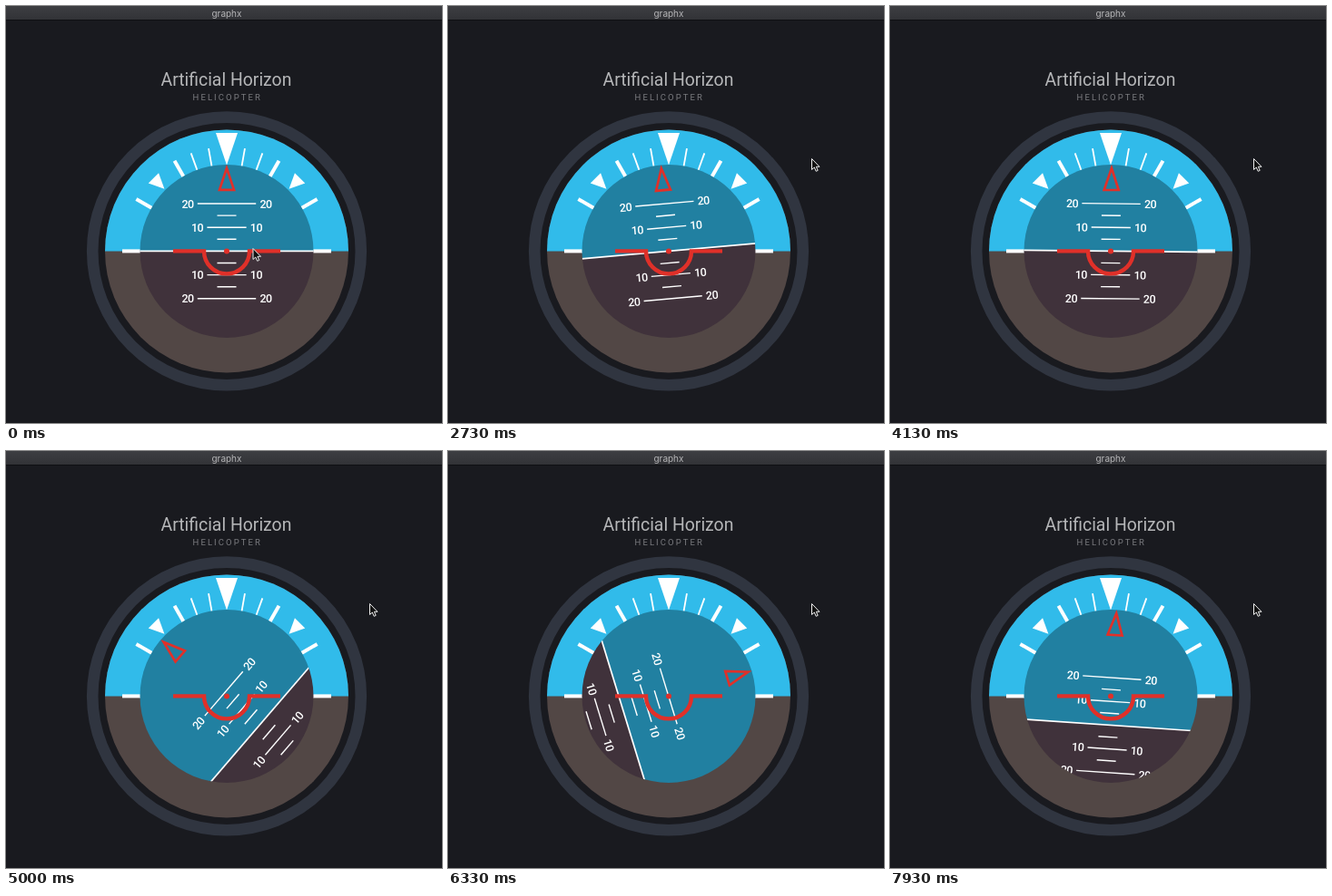
Animation, 480 px wide and 460 px high, one loop 8000 ms. Source, as an HTML page:

```html
<!DOCTYPE html>
<html lang="en">
<head>
<meta charset="utf-8">
<title>Artificial Horizon</title>
<style>
  html, body { margin: 0; width: 100%; height: 100%; overflow: hidden; background: #191a1f; }
  svg { display: block; width: 480px; height: 460px; }
  text { font-family: Roboto, "Open Sans", sans-serif; }
  .label { font-size: 12.5px; font-weight: 500; letter-spacing: -0.5px; fill: #fff; text-anchor: middle; }
</style>
</head>
<body>
<svg viewBox="0 0 480 460">
  <defs>
    <linearGradient id="bar" x2="0" y2="1">
      <stop stop-color="#3d3e42"/>
      <stop offset="1" stop-color="#323337"/>
    </linearGradient>
    <clipPath id="lens"><circle r="95.5"/></clipPath>
  </defs>

  <rect width="480" height="460" fill="#191a1f"/>
  <rect width="480" height="15" fill="url(#bar)"/>
  <rect y="15" width="480" height="1" fill="#0f1013"/>
  <text x="243" y="11.5" text-anchor="middle" fill="#b5b5b7" style="font: 10px Inter, sans-serif">graphx</text>
  <text x="170.5" y="88" font-size="19.4" fill="#b5b6b8">Artificial Horizon</text>
  <text x="205.5" y="104" font-size="9.5" letter-spacing="2.1" fill="#7b7c80">HELICOPTER</text>

  <g transform="translate(243 270.4)">
    <circle r="147.8" fill="none" stroke="#303540" stroke-width="12.6"/>
    <circle r="134" fill="#524745"/>
    <path d="M-134 0A134 134 0 0 1 134 0Z" fill="#31bbea"/>
    <g id="scale" stroke="#fff"></g>
    <path d="M-12 -130.5H12L0 -95Z" fill="#fff"/>

    <g clip-path="url(#lens)">
      <g id="roll">
        <g id="pitch">
          <rect x="-200" y="-300" width="400" height="300" fill="#2180a1"/>
          <rect x="-200" width="400" height="300" fill="#40323b"/>
          <path d="M-200 0H200" stroke="#fff" stroke-width="1.7"/>
          <g id="ladder" stroke-width="1.4"></g>
        </g>
        <path d="M0 -91.5L8 -67.5H-8Z" fill="none" stroke="#e03029" stroke-width="2.7"/>
      </g>
    </g>

    <path d="M-59 0H-25A25 25 0 0 0 25 0H59" fill="none" stroke="#e03029" stroke-width="4.4"/>
    <circle r="3" fill="#e03029"/>
  </g>

  <path id="cursor" d="M0 0V12L2.8 9.5L4.7 13.8L6.7 12.9L4.9 8.8H8.5Z"
        fill="#111" stroke="#eee" stroke-width="1" stroke-linejoin="round"/>
</svg>
<script>
const LOOP = 8000;
const byId = id => document.getElementById(id);

// Each step is [ms, value].
const rollSteps = [[0, 0], [1500, 75], [2730, -5.1], [3400, -42], [4130, 0.6],
                   [5000, -49.4], [6330, 73], [7930, 3.9], [8000, 2]];
const pitchSteps = [[0, 0], [4130, 0], [5000, 48.2], [6330, 52.6], [7930, 32], [8000, 31]];
const cursorX = [[0, 272], [70, 272], [650, 400], [900, 402], [1150, 400.5], [8000, 400.5]];
const cursorY = [[0, 267.5], [70, 267.5], [650, 155], [900, 160], [1150, 168.5], [8000, 168.5]];

// Slope is flat at turning points and at both ends.
function slope(steps, i) {
  const a = steps[i - 1], b = steps[i], c = steps[i + 1];
  if (!a || !c || (b[1] - a[1]) * (c[1] - b[1]) <= 0) return 0;
  return (c[1] - a[1]) / (c[0] - a[0]);
}

function valueAt(steps, t) {
  let i = 0;
  while (i < steps.length - 2 && t >= steps[i + 1][0]) i++;
  const [t0, v0] = steps[i], [t1, v1] = steps[i + 1];
  const span = t1 - t0, u = (t - t0) / span, w = 1 - u;
  return v0 * w * w * (1 + 2 * u) + v1 * u * u * (3 - 2 * u)
       + span * u * w * (w * slope(steps, i) - u * slope(steps, i + 1));
}

function buildScale() {
  let marks = "";
  for (const angle of [10, 20, 30, 45, 60, 90]) {
    for (const side of [-1, 1]) {
      const turn = `transform="rotate(${side * angle})"`;
      marks += angle === 45
        ? `<path ${turn} d="M-8 -114H8L0 -97Z" fill="#fff" stroke="none"/>`
        : `<path ${turn} d="M0 -115V-95" stroke-width="${angle < 30 ? 1.8 : 4}"/>`;
    }
  }
  byId("scale").innerHTML = marks;
}

function buildLadder() {
  let marks = "";
  for (let n = -4; n <= 4; n++) {
    if (!n) continue;
    const y = n * 13.1;
    const major = n % 2 === 0;
    const half = major ? 11 + Math.abs(n) * 5.3 : 10.5;
    marks += `<path d="M${-half} ${y}H${half}" stroke="#fff"/>`;
    if (!major) continue;
    for (const side of [-1, 1]) {
      marks += `<text class="label" x="${side * (half + 10.8)}" y="${y + 4.6}">${Math.abs(n) * 5}</text>`;
    }
  }
  byId("ladder").innerHTML = marks;
}

function draw(now) {
  const t = now % LOOP;
  byId("roll").setAttribute("transform", `rotate(${valueAt(rollSteps, t)})`);
  byId("pitch").setAttribute("transform", `translate(0 ${valueAt(pitchSteps, t)})`);
  byId("cursor").setAttribute("transform", `translate(${valueAt(cursorX, t)} ${valueAt(cursorY, t)})`);
}

buildScale();
buildLadder();
draw(0);

let start;
requestAnimationFrame(function tick(now) {
  start ??= now;
  draw(now - start);
  requestAnimationFrame(tick);
});
</script>
</body>
</html>
```
